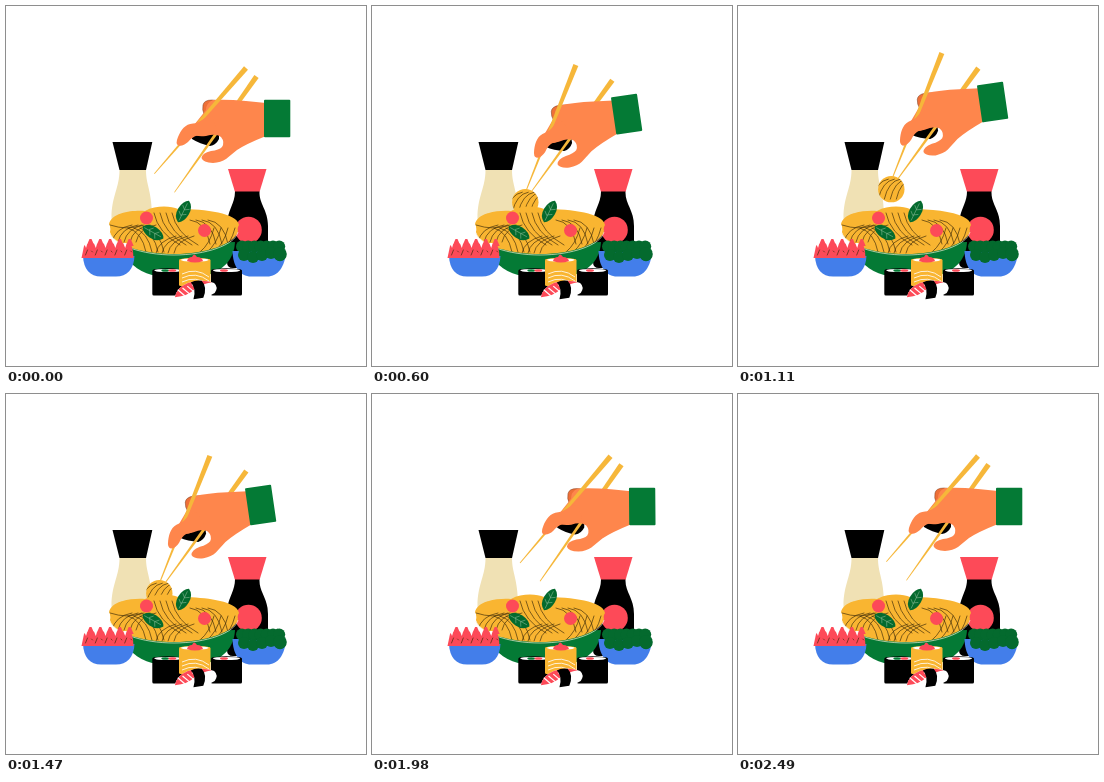
Write an HTML page that moves like this. It is 360 by 360 pixels and loops after 2520 ms.

```html
<!DOCTYPE html>
<html lang="en">
<head>
<meta charset="utf-8">
<title>Noodle bowl</title>
<style>
  html, body { margin: 0; width: 100%; height: 100%; overflow: hidden; background: #fff; }
  svg { display: block; width: 100vw; height: 100vh; }
  .ink { fill: none; stroke: #3a2909; stroke-width: .65; stroke-linecap: round; }
  .vein { fill: none; stroke: #8fbf9c; stroke-width: .5; }
  .noodle { fill: #f9b531; }
  .stick { fill: #f6b73a; }
  .skin { fill: #fe864c; }
  .green { fill: #047a35; }
  .leaf { fill: #046a2e; }
  .blue { fill: #437eea; }
  .red { fill: #fd4a58; }
  .cream { fill: #f0e1b4; }
  .white { fill: #fff; }
</style>
</head>
<body>
<svg viewBox="0 0 360 360">
  <defs>
    <clipPath id="pile"><path d="M103 218C106 206 128 204 139 205C150 199 165 200 172 203C200 203 231 207 233 219Q231 222 232 225C229 238 200 248 168 248C135 248 106 238 104 226Q105 221 103 218Z"/></clipPath>
    <clipPath id="ballClip"><circle r="13.2"/></clipPath>
  </defs>

  <!-- bottles -->
  <path class="cream" d="M113.500 164H140C140 180 146 184 146 212V222H105.500V212C105.500 190 113.500 182 113.500 164Z"/>
  <path d="M106.500 136H146.300L140 164H113.500Z"/>
  <path class="red" d="M222 163H260.500L253.500 186H229Z"/>
  <path d="M229 185.500H253.500C253 198 262 204 262 220V256Q262 262 256 262H227Q221 262 221 256V220C221 204 229 198 229 185.500Z"/>
  <circle class="red" cx="242.500" cy="224" r="13.300"/>

  <!-- hand and chopsticks -->
  <g id="hand">
    <path d="M186 128H213V133Q210 139 204 140Q194 138 186 133Z"/>
    <path d="M206 94Q198 94 197 99Q196 104 198 108L210 112L216 95Z" fill="#ee7038" stroke="#7a3a1a" stroke-width=".5"/>
    <path id="stickB" class="stick"/>
    <path class="skin" d="M260 97L240 95Q220 93 207 94Q200 97 200 104L188 119L187 128Q190 131 200 130Q210 127 215 131Q219 136 216 141Q213 144 205 145Q196 147 195.500 152Q197 156.500 207 157Q215 156.500 220 153L231 144Q240 138 260 130Z"/>
    <path id="stickA" class="stick"/>
    <path id="index" class="skin" d="M207 111C199 109 195 117 187 117.500C179 118 175 124 172 131Q169 138 172.500 139.500Q177 140.500 182 136Q186 131 191 129.500Q202 130 211 124Z"/>
    <rect class="green" x="258" y="93.700" width="26.300" height="37.500" rx="1"/>
  </g>

  <g id="ball">
    <circle class="noodle" r="13.200"/>
    <g id="ballInk" class="ink" clip-path="url(#ballClip)"></g>
  </g>

  <!-- large bowl -->
  <path class="green" d="M117 240L229 236C228 254 217 264 202 269H146C131 265 120 256 117 240Z"/>
  <g clip-path="url(#pile)">
    <rect class="noodle" x="100" y="196" width="136" height="56"/>
    <g id="strands" class="ink"></g>
  </g>
  <path d="M104 227C108 239 136 249 168 249C200 249 229 239 232 226" fill="none" stroke="#f5ecd2" stroke-width=".7"/>
  <circle class="red" cx="140.500" cy="212" r="6.500"/>
  <circle class="red" cx="198.500" cy="224.500" r="6.500"/>
  <g id="leaves"></g>

  <!-- side bowls -->
  <path class="blue" d="M77 250H128.500C128 263 121 270.500 110 270.500H95C84 270.500 77.500 263 77 250Z"/>
  <path class="red" d="M75.500 252L78 240Q79 237.500 82 237.500H123Q127 238 127.500 252Z"/>
  <g id="prawns"></g>
  <path class="blue" d="M226.500 245H280C279 261 272 270.500 261 270.500H245C234 270.500 227 261 226.500 245Z"/>
  <g id="broccoli" class="leaf"></g>

  <!-- sushi -->
  <g id="rolls"></g>
  <g transform="translate(189 284) rotate(-9)">
    <path class="white" d="M-21 4Q-18 -5 -6 -8Q10 -10 20 -4Q24 1 19 6Q10 10 -4 9L-21 6Z"/>
    <path class="red" d="M-21 4Q-18 -5 -6 -8Q8 -10 18 -5Q8 -5 0 -1Q-8 5 -21 4Z"/>
    <g id="stripes" stroke="#fff" stroke-width="1.200"></g>
    <path d="M-3 -8Q2 -2 -3 9H7Q13 -1 8 -8Q2 -10 -3 -8Z"/>
  </g>
</svg>
<script>
const $ = id => document.getElementById(id);
const put = (id, html) => { $(id).innerHTML = html; };
const range = (n, f) => Array.from({ length: n }, (_, i) => f(i)).join('');
const line = d => `<path d="${d}"/>`;
const turn = (id, deg, x, y) => $(id).setAttribute('transform', `rotate(${deg} ${x} ${y})`);

// Evenly spaced arcs: from (x, y), bent by (bx, by), ending (ex, ey) away
const arcs = (n, gap, x, y, bx, by, ex, ey) =>
  range(n, i => line(`M${x + i * gap} ${y}q${bx} ${by} ${ex} ${ey}`));

put('strands',
  arcs(5, 6, 106, 236, 3, -14, 20, -17) +
  arcs(4, 6, 122, 222, 14, 4, 18, 24) +
  arcs(4, 6, 148, 207, 4, 20, 26, 32) +
  arcs(4, 6, 150, 247, 2, -12, 20, -17) +
  arcs(4, 6, 184, 214, 16, 2, 20, 24) +
  arcs(4, 7, 194, 246, 10, -8, 14, -24) +
  line('M104 219Q122 225 136 219'));
put('ballInk', arcs(5, 6, -19, 10, 4, -18, 16, -20));

const leaf = (x, y, deg) => `<g transform="translate(${x} ${y}) rotate(${deg})">
  <path class="leaf" d="M-12 1Q-9 -6 0 -6Q9 -6 12 -1Q9 6 0 6Q-9 6 -12 1Z"/>
  <path class="vein" d="M-10 1L9 -1M-5 0L-2 -4M-4 0L-1 4M2 0L5 -4M2 0L5 4"/></g>`;
put('leaves', leaf(177.5, 205.5, -58) + leaf(147, 226.5, 35));

put('prawns', range(5, i => `<g transform="translate(${84.5 + i * 9.8} 233)">
  <path class="red" d="M-4 7L-1 0H1L4 7Z"/>
  <path class="white" d="M-6.500 4L-4.500 9L-3 4Z"/>
  <path class="ink" d="M-5 16L-3 11M1 12L2 13"/></g>`));

put('broccoli', range(12, i => {
  const top = i < 7, k = top ? i : i - 7;
  const x = top ? 236 + k * 6.2 : 238 + k * 9, y = top ? 240.5 : 249 + 2 * Math.sin(k * 1.6);
  return `<circle cx="${x}" cy="${y}" r="6"/>`;
}) + '<circle cx="274" cy="248" r="6.8"/>');

const roll = (x, y, w, h, color, filling) => `<g transform="translate(${x} ${y})">
  <rect y="-1" width="${w}" height="${h}" rx="1.5" fill="${color}"/>
  <ellipse cx="${w / 2}" rx="${w / 2 - .5}" ry="2.2" fill="${color}"/>
  <ellipse cx="${w / 2}" rx="${w / 2 - 2}" ry="1.6" fill="#fff"/>${filling}</g>`;
const dab = (tone, x) => `<ellipse class="${tone}" cx="${x}" rx="4" ry="1.3"/>`;
put('rolls',
  roll(146.3, 264.5, 31, 26, '#000', dab('green', 13) + dab('red', 20)) +
  roll(205, 264.5, 31, 26, '#000', dab('red', 13)) +
  roll(173, 254, 31.5, 27, '#f9b531',
    '<path class="red" d="M8 1Q9 -3 13 -3Q15 -8 18 -3Q23 -3 24 1Q16 4 8 1Z"/>' +
    '<g fill="none" stroke="#fff" stroke-width=".8">' + range(3, i => line(`M3 ${14 + i * 4}q14 -7 27 3`)) + '</g>'));
put('stripes', range(5, i => line(`M${-17 + i * 5} ${-3 - i}l6 7`)));

// Tapered stick, running down to the left from its thick end
function stick(id, x, y, deg, len) {
  const a = deg * Math.PI / 180, dx = -Math.cos(a), dy = Math.sin(a);
  const at = (k, w) => `${x + dx * len * k - dy * w} ${y + dy * len * k + dx * w}`;
  $(id).setAttribute('d', `M${at(0, 2.6)}L${at(0, -2.6)}L${at(1, -.4)}L${at(1, .4)}Z`);
}
stick('stickA', 240, 62, 49.1, 140);
stick('stickB', 250.5, 70.5, 54.7, 142);

const LOOP = 2520, STEP = 30;
const TOP = 1020, DIP = 540; // moment of the highest lift; bowl touched this long before and after
const clamp = u => Math.min(1, Math.max(0, u));
const smooth = (a, b, v) => { const u = clamp((v - a) / (b - a)); return u * u * (3 - 2 * u); };

// The return mirrors the way in, so the pose depends on the time from the top alone
function draw(time) {
  const away = Math.abs(Math.floor((time % LOOP) / STEP) * STEP - TOP);
  const sink = Math.min(1.2, away / DIP) ** 3;
  const reach = 1 - smooth(660, 1010, away);
  const pinch = clamp((TOP - away) / (TOP - DIP)) ** 2;
  const y = away < DIP ? 96 + 26 * sink : 122 - 9.5 * smooth(560, 980, away);
  $('hand').setAttribute('transform',
    `translate(${271 - 16.5 * reach} ${y}) rotate(${-8.3 * reach}) translate(-271 -112.5)`);
  turn('index', -7 * pinch, 200, 112);
  turn('stickA', -11 * pinch, 205.5, 121.5);
  turn('stickB', 9 * pinch, 216, 146);
  $('ball').setAttribute('transform', `translate(153.3 ${183 + 28 * sink})`);
}

const start = performance.now();
function tick() {
  draw(performance.now() - start);
  requestAnimationFrame(tick);
}
tick();
</script>
</body>
</html>
```
